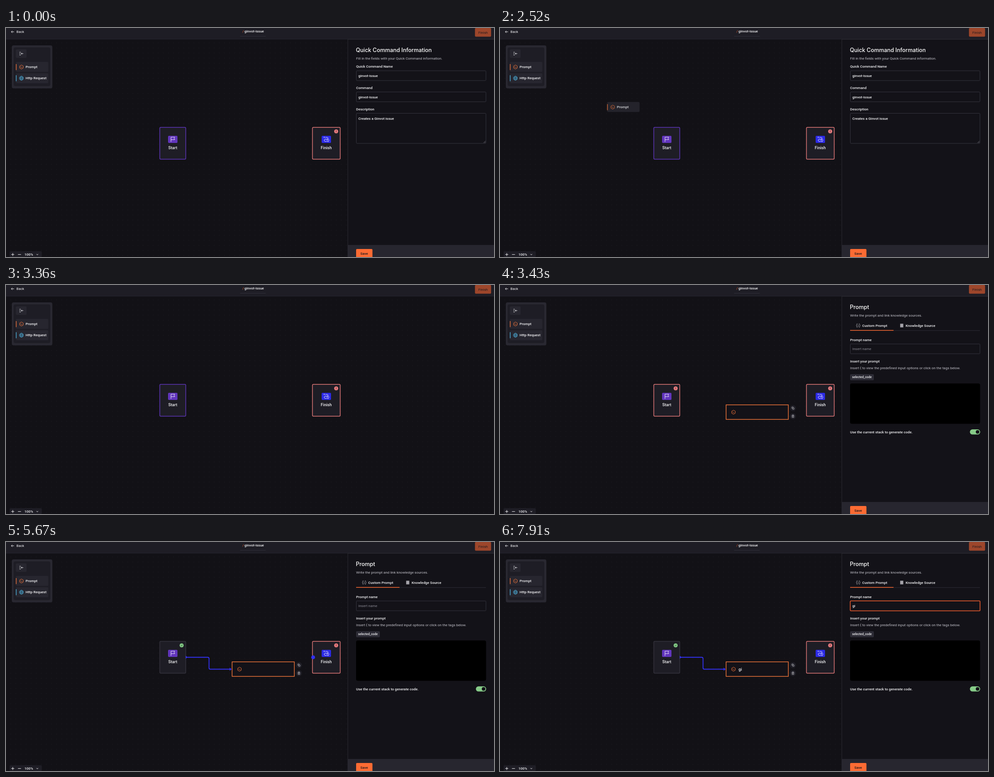
Animation, 1090 px wide and 514 px high, one loop 8000 ms. Source, as an HTML page:

```html
<!DOCTYPE html>
<html lang="en">
<head>
<meta charset="utf-8">
<title>Quick command editor</title>
<style>
  html, body { margin: 0; width: 100%; height: 100%; overflow: hidden; background: #121116; }
  svg { display: block; width: 100%; height: 100%; fill: none; }
  text { font: 400 7.95px Roboto, sans-serif; fill: #f4f4f6; white-space: pre; }
  .medium { font-weight: 500; }
  .title { font: 500 12.4px Inter, sans-serif; fill: #fff; }
  .soft { fill: #c3c2ca; }
  .hint { fill: #8b8a94; }
  .dark { fill: #201a1e; }
  .node { font-size: 9.1px; font-weight: 500; text-anchor: middle; }
  .chip { font-size: 6.8px; font-weight: 500; }
  .field { fill: #131218; stroke: #35343e; }
  .item { fill: #27262f; }
  .card { fill: #1e1d25; stroke-width: 1.5; }
  .white { stroke: #f4f4f6; }
  .orange { stroke: #f7783c; }
  .blue { stroke: #3231ee; stroke-width: 1.9; }
  .port { fill: #3231f2; }
  .caret { stroke: #fff; stroke-width: .8; }
</style>
</head>
<body>
<svg viewBox="0 0 1090 514" preserveAspectRatio="none">
  <defs>
    <pattern id="grid" x="5" y="5" width="11.36" height="11.36" patternUnits="userSpaceOnUse">
      <circle cx="5.7" cy="5.7" r=".55" fill="#2b2a33"/>
    </pattern>
    <g id="hexagon" class="orange" stroke-width=".9">
      <path d="M0-4.6 4-2.3V2.3L0 4.6-4 2.3V-2.3ZM-2-1.3-.5 0-2 1.3M.2 1.4H2"/>
    </g>
    <g id="promptItem">
      <rect class="item" x="22" y="76" width="72.5" height="22.5" rx="2.5"/>
      <path class="orange" d="M22.7 81V94.5" stroke-width="1.3"/>
      <use href="#hexagon" x="34.5" y="87.6"/>
      <text class="medium" x="43.8" y="90.4">Prompt</text>
    </g>
    <g id="alert">
      <circle r="4.6" fill="#e37a7c"/>
      <path d="M0-2.2V.5M0 1.4V2.2" stroke="#3a1d24" stroke-width=".9"/>
    </g>
    <g id="done">
      <circle r="4.6" fill="#80c783"/>
      <path d="M-1.8.1-.5 1.4 1.9-1.2" stroke="#1b2a20" stroke-width=".9"/>
    </g>
  </defs>

  <rect width="1090" height="514" fill="#121116"/>
  <rect y="25" width="1090" height="489" fill="url(#grid)"/>

  <!-- header -->
  <rect width="1090" height="25" fill="#1e1d25"/>
  <path d="M0 25H1090" stroke="#27262e"/>
  <path class="white" d="M18 8.6H11.8M14.4 6 11.8 8.6 14.4 11.2" stroke-width=".9"/>
  <text x="23.2" y="11.4">Back</text>
  <text x="528" y="9.8" style="fill:#f2622d">/</text>
  <text class="medium" x="532.6" y="9.8">ginvot-issue</text>
  <path d="M523 18.5H580" stroke="#302f39"/>
  <rect x="1047.5" y="0" width="36" height="19.5" rx="2" fill="#9d462b"/>
  <text class="dark" x="1055" y="12.6">Finish</text>

  <!-- palette -->
  <rect x="13" y="39" width="90.5" height="96.5" rx="4" fill="#292831"/>
  <rect x="17" y="43.5" width="82" height="87" rx="4" fill="#1e1d25"/>
  <rect class="item" x="22" y="48" width="24" height="19" rx="2"/>
  <path class="white" d="M30 54.4H33M30 57.5H32M30 60.6H33M38.5 57.5H33.8M35.6 55.6 33.7 57.5 35.6 59.4" stroke-width=".9"/>
  <use href="#promptItem"/>
  <rect class="item" x="22" y="101.5" width="72.5" height="22.5" rx="2.5"/>
  <g stroke="#4fb9e6" stroke-width=".8">
    <path d="M22.7 106V119.5" stroke-width="1.3"/>
    <circle cx="34.5" cy="112.7" r="4.5"/>
    <ellipse cx="34.5" cy="112.7" rx="2" ry="4.5"/>
    <path d="M30.3 111.3H38.7M30.3 114.1H38.7"/>
  </g>
  <text class="medium" x="43.8" y="115.4">Http Request</text>

  <!-- zoom -->
  <rect x="8" y="501" width="72" height="13" rx="2" fill="#1e1d25"/>
  <path class="white" d="M11.8 508.4H18.4M15.1 505.1V511.7M26.7 508.4H33.5M68 507.4 69.9 509.3 71.8 507.4"/>
  <text class="medium" x="41.2" y="511.3">100%</text>

  <!-- start and finish -->
  <rect id="startCard" class="card" x="343.5" y="223" width="58" height="71.5" rx="2"/>
  <rect x="362" y="242" width="21" height="16" rx="2" fill="#6236bd"/>
  <path class="white" d="M368.6 255.5V245H377L375.4 247.8 377 250.6H368.6" stroke-width=".9"/>
  <text class="node" x="372.5" y="271.8">Start</text>
  <use id="startAlert" href="#alert" x="392.3" y="232"/>
  <use id="startDone" href="#done" x="392.3" y="232"/>

  <rect class="card" x="684.5" y="223" width="62" height="71.5" rx="2" stroke="#df7777"/>
  <rect x="705" y="242" width="21" height="16" rx="2" fill="#2c2ae6"/>
  <path class="white" d="M709.6 244.2 712 246.6M712 244.2 709.6 246.6M713.5 245.6H717.5Q719.5 245.8 719.3 247.6 719 249.6 716.5 249.6H713Q710.8 249.8 710.8 252 710.8 254.6 713.4 254.6H716.6M719.2 255.6Q716.9 252.6 717.2 251.6A2 2 0 0 1 721.2 251.6Q721.4 252.6 719.2 255.6Z" stroke-width=".9"/>
  <text class="node" x="715.3" y="271.8">Finish</text>
  <use href="#alert" x="737.5" y="232"/>

  <!-- prompt node -->
  <g id="promptNode">
    <rect class="orange" x="505" y="269" width="139" height="32.6" fill="#131218" stroke-width="1.4"/>
    <use href="#hexagon" x="521.5" y="285.5"/>
    <text id="nodeName" x="532.8" y="288.6" style="font-size:9.1px;font-weight:500"></text>
    <g fill="#1e1d25" stroke="#2b2a33" stroke-width=".6">
      <circle cx="654.3" cy="276.4" r="6.2"/>
      <circle cx="654.3" cy="294.5" r="6.2"/>
    </g>
    <path d="M653.6 275.8H656.8V279H653.6ZM652.8 277H651.9V273.8H655.1V274.8M651.6 292.8H657M653.2 292.6V291.6H655.4V292.6M652.3 293V297.3H656.3V293M653.7 294.2V296M654.9 294.2V296" stroke="#d5d4da" stroke-width=".7"/>
  </g>
  <path id="dragLine" class="blue"/>
  <g id="edge">
    <path class="blue" d="M402 258.7H450.5Q453.5 258.7 453.5 261.7V282.5Q453.5 285.5 456.5 285.5H502"/>
    <path class="port" d="M401.5 255.3 405.4 258.7 401.5 262ZM499.6 281.9 504 285.5 499.6 289.1Z"/>
  </g>
  <circle id="startPort" class="port" cx="401.2" cy="258.7" r="4.4"/>
  <circle id="finishPort" class="port" cx="686" cy="258.7" r="4.3"/>
  <circle id="nodePort" class="port" cx="506.4" cy="285.6" r="4.4"/>
  <g id="nodePorts" class="port">
    <circle cx="506.4" cy="285.6" r="4.2"/>
    <circle cx="643.6" cy="285.6" r="4.2"/>
    <circle cx="574.5" cy="269.5" r="4.2"/>
    <circle cx="574.5" cy="301.6" r="4.2"/>
  </g>
  <use id="ghost" href="#promptItem"/>

  <!-- side panel -->
  <g id="panel">
    <rect x="763.5" y="25.5" width="328" height="490" fill="#131218" stroke="#2a2932"/>
    <rect x="764" y="487" width="326" height="27" fill="#27262f"/>
    <rect x="782" y="496" width="36.5" height="20" rx="2" fill="#fc6b33"/>
    <text class="dark medium" x="791.4" y="508.5">Save</text>

    <g id="infoForm">
      <text class="title" x="781.6" y="54">Quick Command Information</text>
      <text class="soft" x="782" y="70.6">Fill in the fields with your Quick Command information.</text>
      <text class="medium" x="782" y="89.4">Quick Command Name</text>
      <rect class="field" x="782.5" y="96" width="289.5" height="22" rx="1.5"/>
      <text class="medium" x="787" y="109.8">ginvot-issue</text>
      <text class="medium" x="782" y="137.2">Command</text>
      <rect class="field" x="782.5" y="143.6" width="289.5" height="22" rx="1.5"/>
      <text class="medium" x="787" y="157.6">ginvot-issue</text>
      <text class="medium" x="782" y="185">Description</text>
      <rect class="field" x="782.5" y="191.5" width="289.5" height="67.5" rx="1.5"/>
      <text class="medium" x="787" y="205.8">Creates a Ginvot issue</text>
      <path d="M1066.5 258 1071 253.5M1069 258 1071 256" stroke="#8b8a94" stroke-width=".7"/>
    </g>

    <g id="promptForm">
      <text class="title" x="781.6" y="54">Prompt</text>
      <text class="soft" x="782" y="70.6">Write the prompt and link knowledge sources.</text>
      <path d="M782 102.3H1072" stroke="#2f2e38"/>
      <path d="M782 101.7H879" stroke="#f2622d" stroke-width="1.4"/>
      <path d="M798.4 86.8Q796.9 86.8 796.9 88.3V89.6L795.7 91 796.9 92.4V93.7Q796.9 95.2 798.4 95.2M801.8 86.8Q803.3 86.8 803.3 88.3V89.6L804.5 91 803.3 92.4V93.7Q803.3 95.2 801.8 95.2M800.1 88.2V89.2M800.1 90.2V93.8" stroke="#d5d4da" stroke-width=".8"/>
      <text class="medium" x="809" y="93.8">Custom Prompt</text>
      <path d="M893.8 88.2H900.8M893.8 91H900.8M893.8 93.8H900.8" stroke="#d5d4da" stroke-width="2"/>
      <text class="medium" x="906" y="93.8">Knowledge Source</text>
      <text class="medium" x="782" y="125.6">Prompt name</text>
      <rect class="field" x="782.5" y="132.3" width="289.5" height="22" rx="1.5"/>
      <rect id="focusRing" x="782.3" y="132.2" width="290" height="22.2" rx="1.5" stroke="#ee5b2c" stroke-width="1.5"/>
      <text id="placeholder" class="hint" x="787" y="146.4">Insert name</text>
      <text id="typed" class="medium" x="787" y="146.4"></text>
      <path id="caret" class="caret" d="M.4 139V148.5"/>
      <text class="medium" x="782" y="173.5">Insert your prompt</text>
      <text class="soft" x="782" y="189.4">Insert { to view the predefined input options or click on the tags below.</text>
      <rect x="782" y="200.3" width="53" height="13.5" rx="2" fill="#2d2c36"/>
      <text class="chip" x="786.4" y="209.3">selected_code</text>
      <rect x="782" y="221" width="290.3" height="90.5" rx="4" fill="#000"/>
      <text class="medium" x="782" y="332.6">Use the current stack to generate code.</text>
      <rect x="1049.5" y="324" width="23" height="11.6" rx="5.8" fill="#86cb88"/>
      <circle cx="1066.7" cy="329.8" r="4" fill="#131218"/>
    </g>
  </g>
</svg>
<script>
const LOOP = 8000, STEP = 70;
const el = id => document.getElementById(id);
const show = (id, on) => { el(id).style.display = on ? '' : 'none'; };
const set = (id, attrs) => Object.entries(attrs).forEach(([k, v]) => el(id).setAttribute(k, v));
const progress = (t, a, b) => Math.min(1, Math.max(0, (t - a) / (b - a)));
const mix = (a, b, p) => a + (b - a) * p;
const ease = p => (1 - Math.cos(Math.PI * p)) / 2;

function drawGhost(t) {
  const sweep = ease(progress(t, 2240, 2800)), settle = progress(t, 2800, 3080);
  set('ghost', {
    x: mix(30.5, 404, sweep) + 33.5 * settle,
    y: mix(17.5, 162.5, sweep) + 16 * settle,
    opacity: mix(.35, .88, progress(t, 2240, 2450))
  });
}

function drawConnection(t) {
  const p = ease(progress(t, 4060, 4480));
  const x = mix(402, 506, p), y = mix(258.7, 285.6, p), mid = (402 + x) / 2;
  set('dragLine', { d: `M402 258.7C${mid} 258.7 ${mid} ${y} ${x} ${y}` });
}

function drawTyping(t) {
  const name = t >= 7350 ? 'gi' : t >= 7210 ? 'g' : '';
  el('typed').textContent = el('nodeName').textContent = name;
  show('placeholder', !name);
  set('focusRing', { opacity: progress(t, 6230, 6510) });
  show('caret', (t >= 6300 && t < 6860) || (t >= 7210 && t < 7910));
  const end = 787 + (name ? el('typed').getComputedTextLength() : 0);
  set('caret', { transform: `translate(${end})` });
}

function draw(time) {
  const t = Math.floor(time % LOOP / STEP) * STEP;
  const between = (a, b) => t >= a && t < b;
  const dropped = t >= 3430, linked = t >= 4830;

  show('panel', !between(3360, 3430));
  show('infoForm', t < 3360);
  show('promptForm', dropped);
  show('promptNode', dropped);

  set('startCard', {
    stroke: linked ? '#34333d' : dropped ? '#df7777' : '#5c35b6',
    'stroke-width': linked ? 1 : 1.5
  });
  show('startAlert', dropped && !linked);
  show('startDone', linked);
  show('edge', linked);

  show('startPort', between(3850, 4200));
  show('nodePort', between(4480, 4830));
  show('nodePorts', between(4970, 5670));
  show('finishPort', between(5670, 5740));
  show('dragLine', between(4130, 4830));
  show('ghost', between(2240, 3360));

  drawGhost(t);
  drawConnection(t);
  drawTyping(t);
}

function loop() {
  draw(performance.now());
  requestAnimationFrame(loop);
}
loop();
</script>
</body>
</html>
```
